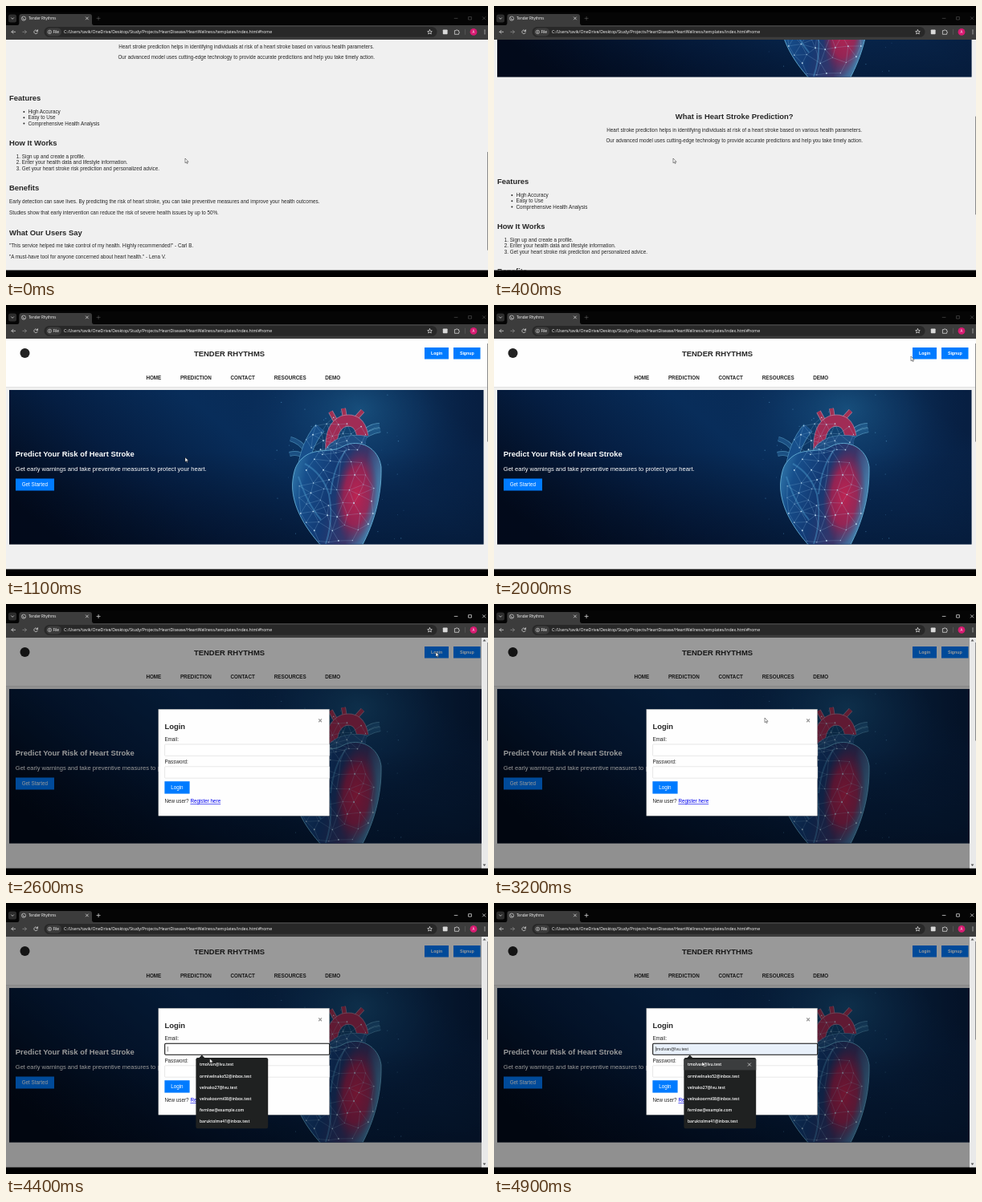
An HTML page for the animation above (5 s loop, 600x338 px).

```html
<!DOCTYPE html>
<html lang="en">
<head>
<meta charset="utf-8">
<title>Tender Rhythms</title>
<style>
  html, body { margin: 0; width: 100%; height: 100%; overflow: hidden; background: #000; }
  svg { display: block; width: 600px; height: 338px; }
  text { font-family: "Liberation Sans", Arial, sans-serif; font-size: 6.3px; fill: #262626; white-space: pre; }
  .ui { font-family: "Open Sans", "Noto Sans", sans-serif; font-size: 5.2px; fill: #fff; }
  .h { font-size: 9.45px; font-weight: 700; }
  .b { font-weight: 700; }
  .w { fill: #fff; }
  .small { font-size: 5.25px; }
  .lead { font-size: 7.56px; }
  .mail { font-size: 5px; font-weight: 600; }
  .mid { text-anchor: middle; }
  .line { fill: none; stroke: #d4d4d4; stroke-width: .8; stroke-linecap: round; }
</style>
</head>
<body>
<svg viewBox="0 0 600 338" xmlns="http://www.w3.org/2000/svg">
  <defs>
    <clipPath id="view"><rect y="41" width="600" height="288.5"/></clipPath>
    <clipPath id="heroBox"><rect x="4" y="106" width="590.5" height="192.6"/></clipPath>
    <linearGradient id="sky" y1=".7" y2=".3">
      <stop offset="0" stop-color="#020a1a"/><stop offset=".3" stop-color="#051e42"/>
      <stop offset=".55" stop-color="#082d5a"/><stop offset=".75" stop-color="#092b56"/>
      <stop offset="1" stop-color="#071f42"/>
    </linearGradient>
    <radialGradient id="glow">
      <stop offset="0" stop-color="#1f6393" stop-opacity=".65"/>
      <stop offset=".5" stop-color="#154d80" stop-opacity=".35"/>
      <stop offset="1" stop-color="#0b2f5c" stop-opacity="0"/>
    </radialGradient>
    <linearGradient id="floor" x2="0" y2="1">
      <stop offset=".4" stop-color="#020a1c" stop-opacity="0"/>
      <stop offset="1" stop-color="#020a1c" stop-opacity=".45"/>
    </linearGradient>
    <linearGradient id="flesh" x2="1" y2=".3">
      <stop offset="0" stop-color="#3b86b5"/><stop offset=".22" stop-color="#174f8c"/>
      <stop offset=".5" stop-color="#133a74"/><stop offset=".8" stop-color="#3a3569"/>
      <stop offset="1" stop-color="#4579a6"/>
    </linearGradient>
    <radialGradient id="red">
      <stop offset="0" stop-color="#bd2452"/><stop offset=".6" stop-color="#a3204f" stop-opacity=".85"/>
      <stop offset="1" stop-color="#702553" stop-opacity="0"/>
    </radialGradient>
    <filter id="soft"><feGaussianBlur stdDeviation=".5"/></filter>
  </defs>

  <rect width="600" height="338" fill="#000"/>
  <g clip-path="url(#view)">
    <rect y="41" width="600" height="289" fill="#f0f0f0"/>
    <g id="page"></g>
    <rect id="thumb" x="599" width="1" height="122.5" fill="#8b8b8b"/>
    <g id="modal">
      <rect y="41" width="592" height="289" opacity=".4"/>
      <rect x="592" y="41" width="8" height="289" fill="#e9e9e9"/>
      <path d="M593.6 46.4l1.9-2.4 1.9 2.4zM593.6 324.6l1.9 2.4 1.9-2.4z" fill="#555"/>
      <rect x="599" y="48" width="1" height="122.5" fill="#8b8b8b"/>
      <rect x="189.8" y="131.2" width="212.8" height="133" fill="#fefefe" stroke="#888" stroke-width=".4"/>
      <g id="form"></g>
      <g id="focus">
        <rect id="field" x="197.7" y="175.2" width="205" height="14" rx="1.2" stroke="#101010" stroke-width="1.1"/>
        <text id="typed" x="201.6" y="184" class="small"></text>
        <path d="M201.4 179v6.4" stroke="#222" stroke-width=".5"/>
      </g>
      <g id="popup">
        <path d="M240 193.4l3.8-3.8 3.8 3.8z" fill="#1f2121"/>
        <rect x="236.4" y="193" width="89.8" height="88.2" rx="2.2" fill="#1f2121"/>
        <g id="pick">
          <rect x="236.4" y="195" width="89.8" height="13.4" fill="#3b3d3e"/>
          <path class="line" d="M316.2 199.8l3.4 3.4m0-3.4l-3.4 3.4"/>
        </g>
        <g id="mails"></g>
      </g>
    </g>
  </g>
  <g id="chrome"></g>
  <path id="arrow" d="M0 0V5.8L1.4 4.6 2.3 6.6 3.2 6.2 2.3 4.3H4.1Z" fill="#fff" stroke="#111" stroke-width=".45"/>
  <path id="beam" d="M-1.2-3.2Q0-3.2 0-2.6 0-3.2 1.2-3.2M0-2.6V2.6M-1.2 3.2Q0 3.2 0 2.6 0 3.2 1.2 3.2" fill="none" stroke="#222" stroke-width=".6"/>
</svg>
<script>
const $ = id => document.getElementById(id);
const text = (x, y, s, cls = '') => `<text x="${x}" y="${y}" class="${cls}">${s}</text>`;
const rect = (x, y, w, h, fill, more = '') =>
  `<rect x="${x}" y="${y}" width="${w}" height="${h}" fill="${fill}" ${more}/>`;
const dot = (x, y, r, fill, more = '') => `<circle cx="${x}" cy="${y}" r="${r}" fill="${fill}" ${more}/>`;
const path = (d, more = 'class="line"') => `<path d="${d}" ${more}/>`;
const BLUE = '#007bff';

let seed = 11;
const rnd = () => (seed = seed * 16807 % 2147483647) / 2147483647;

// Glowing net of linked points inside an ellipse
function net(cx, cy, rx, ry, gap) {
  const pts = [];
  for (let tries = 0; tries < 1500; tries++) {
    const a = rnd() * Math.PI * 2, r = Math.sqrt(rnd());
    const x = cx + rx * r * Math.cos(a), y = cy + ry * r * Math.sin(a);
    if (pts.every(p => Math.hypot(p[0] - x, p[1] - y) > gap)) pts.push([x, y]);
  }
  const spot = p => p.map(v => v.toFixed(1)).join(' ');
  let d = '', dots = '';
  pts.forEach((p, i) => {
    pts.slice(i + 1).forEach(q => {
      if (Math.hypot(p[0] - q[0], p[1] - q[1]) < gap * 1.75) d += `M${spot(p)}L${spot(q)}`;
    });
    dots += dot(p[0].toFixed(1), p[1].toFixed(1), (.4 + rnd() * .6).toFixed(2), '#d3eeff', 'opacity=".8"');
  });
  return path(d, 'fill="none" stroke="#9fd0ef" stroke-width=".4" opacity=".5"') + dots;
}

function specks() {
  let s = '';
  for (let i = 0; i < 55; i++) {
    s += dot((335 + rnd() * 160).toFixed(1), (112 + rnd() * 180).toFixed(1), (.25 + rnd() * .5).toFixed(2), '#5ba4d6', 'opacity=".5"');
  }
  return s;
}

// A vessel is a soft wide stroke with a lighter rim
const vessel = (d, w, rim, fill) =>
  path(d, `fill="none" stroke="${rim}" stroke-width="${w}" opacity=".75"`) +
  path(d, `fill="none" stroke="${fill}" stroke-width="${w - 1.6}"`);

function heart() {
  return [
    '<g filter="url(#soft)">',
    vessel('M438 172Q450 158 466 156M440 164Q452 150 465 150', 6, '#5fa3c9', '#1e5686'),
    vessel('M374 182Q366 170 354 167M372 190Q364 183 353 186', 6, '#5297c0', '#1b4f82'),
    vessel('M411 146L404 133M422 141L420 129M434 143L444 132', 6, '#cf8ba4', '#a03053'),
    vessel('M405 184Q403 152 420 145Q440 140 444 164', 15, '#c9839f', '#a02c55'),
    vessel('M369 208Q373 174 391 153', 14, '#5a9fc8', '#174f8b'),
    vessel('M398 192Q411 164 448 170', 14, '#5595bf', '#1e4d82'),
    path('M368 192C384 176 404 186 420 176C440 166 464 178 467 202C468 242 456 278 440 306H398C376 284 353 250 357 218C359 203 362 198 368 192Z',
      'fill="url(#flesh)" stroke="#65aed4" stroke-width=".9"'),
    '<ellipse cx="436" cy="238" rx="26" ry="60" fill="url(#red)" transform="rotate(5 436 238)"/>',
    path('M372 198Q394 210 402 236Q408 268 398 298M364 214Q374 246 392 268M424 180Q408 200 404 236',
      'fill="none" stroke="#4d9acb" stroke-width="2" opacity=".45"'),
    '</g>',
    net(412, 238, 49, 64, 12), net(411, 165, 38, 25, 10)
  ].join('');
}

function page() {
  const nav = [[174.4, 'HOME'], [216.9, 'PREDICTION'], [279.5, 'CONTACT'], [333.8, 'RESOURCES'], [397.2, 'DEMO']];
  const body = [
    [4, 432, 'Features', 'h'],
    [27.5, 448.1, 'High Accuracy'], [27.5, 455.3, 'Easy to Use'], [27.5, 462.5, 'Comprehensive Health Analysis'],
    [4, 488.2, 'How It Works', 'h'],
    [12.8, 504.2, '1. Sign up and create a profile.'],
    [12.8, 511.4, '2. Enter your health data and lifestyle information.'],
    [12.8, 518.6, '3. Get your heart stroke risk prediction and personalized advice.'],
    [4, 544.3, 'Benefits', 'h'],
    [4, 560.2, 'Early detection can save lives. By predicting the risk of heart stroke, you can take preventive measures and improve your health outcomes.'],
    [4, 573.8, 'Studies show that early intervention can reduce the risk of severe health issues by up to 50%.'],
    [4, 599.6, 'What Our Users Say', 'h'],
    [4, 615.4, '"This service helped me take control of my health. Highly recommended!" - Carl B.'],
    [4, 629.2, '"A must-have tool for anyone concerned about heart health." - Lena V.'],
    [299.2, 350.7, 'What is Heart Stroke Prediction?', 'h mid'],
    [299.2, 366.6, 'Heart stroke prediction helps in identifying individuals at risk of a heart stroke based on various health parameters.', 'mid'],
    [299.2, 380.2, 'Our advanced model uses cutting-edge technology to provide accurate predictions and help you take timely action.', 'mid']
  ];
  return [
    rect(0, 41, 600, 61, '#fefefe'), rect(0, 102, 600, .8, '#dedede'),
    dot(23.5, 60, 6, '#222'),
    text(278, 63.6, 'TENDER RHYTHMS', 'h mid'),
    rect(521, 53, 30, 14.5, BLUE), rect(557, 53, 33.5, 14.5, BLUE),
    text(536.1, 62.2, 'Login', 'b w mid small'), text(573.8, 62.2, 'Signup', 'b w mid small'),
    ...nav.map(([x, s]) => text(x, 92.7, s, 'b')),
    '<g clip-path="url(#heroBox)">',
    rect(4, 106, 591, 193, 'url(#sky)'),
    '<ellipse cx="440" cy="130" rx="150" ry="120" fill="url(#glow)"/>',
    rect(4, 106, 591, 193, 'url(#floor)'), specks(), heart(), '</g>',
    text(11.8, 189.4, 'Predict Your Risk of Heart Stroke', 'h w'),
    text(11.8, 206.6, 'Get early warnings and take preventive measures to protect your heart.', 'w lead'),
    rect(12, 216.5, 48, 15, BLUE), text(19.7, 226.4, 'Get Started', 'w'),
    ...body.map(row => text(...row)),
    ...[446, 453.2, 460.4].map(y => dot(22.4, y, 1, '#262626'))
  ].join('');
}

function form() {
  const box = y => rect(197.6, y, 205.2, 14.4, '#fff', 'rx=".8" stroke="#ccc" stroke-width=".45"');
  return [
    text(197.4, 155.6, 'Login', 'h'),
    path('M389.2 143.4l3.8 3.8m0-3.8l-3.8 3.8', 'stroke="#999" stroke-width="1.3"'),
    text(197.4, 170.8, 'Email:'), box(175),
    text(197.4, 198.9, 'Password:'), box(202.8),
    rect(197.4, 221.2, 31.2, 15.4, BLUE), text(205.2, 231, 'Login', 'w'),
    text(197.4, 248.4, 'New user?'),
    '<text x="229.4" y="248.4" style="fill:#0000ee" text-decoration="underline">Register here</text>'
  ].join('');
}

function chrome() {
  return [
    rect(0, 8, 600, 16, '#050505'),
    rect(3, 10.4, 10, 10, '#2d2d2d', 'rx="2.5"'), path('M6.6 14.8l1.5 1.5 1.5-1.5'),
    path('M14 24Q16.4 24 16.4 21V13Q16.4 10 19.4 10H104Q107 10 107 13V21Q107 24 109.4 24Z', 'fill="#3c3c3c"'),
    dot(22, 15.6, 2.6, 'none', 'stroke="#d0d0d0" stroke-width=".7"'),
    path('M19.8 14.6q1.4.2 2 1.4t2.4.8M21 17.6l.8-1.6', 'fill="none" stroke="#d0d0d0" stroke-width=".6"'),
    '<text x="28.2" y="17.2" class="ui" style="font-size:4.5px">Tender Rhythms</text>',
    path('M99.4 13.9l3 3m0-3l-3 3'),
    '<g id="controls">',
    path('M113 15.4h4.2m-2.1-2.1v4.2M558.2 15.4h3.8M576 13.6h3.4v3.4h-3.4zM593.4 13.6l3.4 3.4m0-3.4l-3.4 3.4'), '</g>',
    rect(0, 24, 600, 18, '#3c3c3c'),
    path('M11.6 32.3H7m2-2l-2 2 2 2'),
    path('M20.8 32.3h4.6m-2-2l2 2-2 2', 'class="line" style="stroke:#8a8a8a"'),
    path('M39.2 31.2A2.3 2.3 0 1 0 39.3 33.2M39.5 29.7v1.8h-1.8'),
    rect(47.5, 26, 489, 12.8, '#282828', 'rx="6.4"'),
    rect(50, 27.4, 19, 10, '#3c3c3c', 'rx="5"'),
    dot(54.4, 32.4, 2.2, 'none', 'stroke="#ddd" stroke-width=".6"'),
    path('M54.4 32.2v1.2M54.4 31.1v.1'),
    '<text x="58.4" y="34.2" class="ui" style="font-size:4.8px">File</text>',
    text(72, 34.3, 'C:/Users/tavik/OneDrive/Desktop/Study/Projects/HeartDisease/HeartWellness/templates/index.html#home', 'ui'),
    path('M527.5 29.6l.8 1.9 2 .2-1.5 1.3.5 2-1.8-1.1-1.8 1.1.5-2-1.5-1.3 2-.2z'),
    rect(543.8, 29.4, 5.8, 5.8, '#d9d9d9', 'rx=".8"'),
    path('M558.8 30.6h1.5a.9.9 0 0 1 1.8 0h1.5v1.5a.9.9 0 0 1 0 1.8v1.4h-4.8z'),
    path('M571.5 28.8v7', 'stroke="#666" stroke-width=".5"'),
    dot(582, 32.4, 4.4, '#d81b72'),
    '<text x="582" y="34" class="ui mid" style="font-size:4.4px">A</text>',
    ...[30.2, 32.4, 34.6].map(y => dot(596, y, .65, '#ddd'))
  ].join('');
}

const mails = ['tmolvan@lvu.test', 'ormivelnako52@inbox.test', 'velnako27@lvu.test',
  'velnakoormi08@inbox.test', 'fernlow@example.com', 'baruktolme41@inbox.test'];

$('page').innerHTML = page();
$('form').innerHTML = form();
$('chrome').innerHTML = chrome();
$('mails').innerHTML = mails.map((m, i) => text(241, (203.4 + i * 14.2).toFixed(1), m, 'ui mail')).join('');
$('typed').textContent = mails[0];

const LOOP = 5000, STEP = 100;
const scroll = [[0, 314], [100, 306], [300, 250], [500, 170], [700, 88], [900, 26], [1100, 0]];
const mouse = [[0, 223, 190], [1200, 223, 190], [1500, 330, 140], [1800, 480, 82], [2000, 519, 64],
  [2200, 535, 60], [2700, 535, 60], [3000, 400, 118], [3200, 337, 142], [3600, 243, 184],
  [4200, 243, 186], [4500, 259, 198], [5000, 259, 198]];
const OPEN = 2600, FOCUS = 3700, LIST = 3800, HOVER = 4500;

function at(keys, t) {
  const i = keys.findIndex(k => k[0] > t);
  if (i < 0) return keys[keys.length - 1].slice(1);
  const a = keys[i - 1], b = keys[i], f = (t - a[0]) / (b[0] - a[0]);
  return a.slice(1).map((v, n) => v + (b[n + 1] - v) * f);
}
const show = (id, on) => $(id).setAttribute('display', on ? 'inline' : 'none');
const move = (id, x, y) => $(id).setAttribute('transform', `translate(${x} ${y})`);

function draw(now) {
  const t = Math.floor(now % LOOP / STEP) * STEP;
  const [top] = at(scroll, t), [x, y] = at(mouse, t);
  const typing = t >= 3600 && t < 4300;
  move('page', 0, -top);
  $('thumb').setAttribute('y', 48 + top * .427);
  show('modal', t >= OPEN);
  show('focus', t >= FOCUS);
  show('popup', t >= LIST);
  show('pick', t >= HOVER);
  show('typed', t >= HOVER);
  $('field').setAttribute('fill', t >= HOVER ? '#e8f0fa' : '#fff');
  $('controls').setAttribute('opacity', t >= OPEN ? 1 : .3);
  show('arrow', !typing);
  show('beam', typing);
  move('arrow', x, y);
  move('beam', x, y);
}

const start = performance.now();
function tick() {
  draw(performance.now() - start);
  requestAnimationFrame(tick);
}
tick();
</script>
</body>
</html>
```
